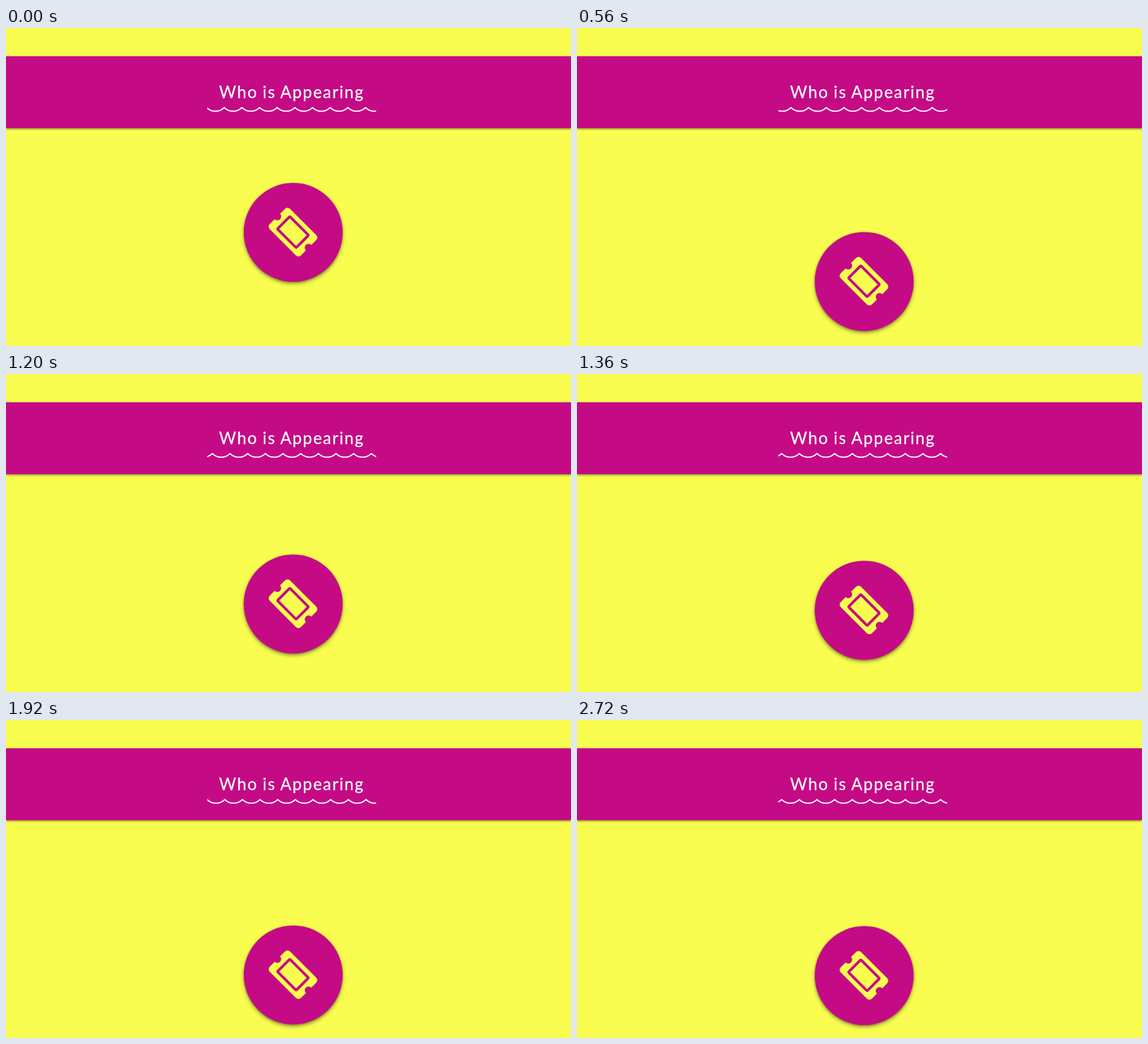
Recreate the animation shown at these times as an HTML page. Size 960 px wide and 540 px high, loop 2.8 s.

```html
<!DOCTYPE html>
<html lang="en">
<head>
<meta charset="utf-8">
<title>Who is Appearing</title>
<style>
  html, body { margin: 0; width: 100%; height: 100%; overflow: hidden; background: #f9fd50; }
  body { position: relative; }
  .bar, .ball, .wave { position: absolute; }
  .bar {
    left: 0; top: 48px; width: 960px; height: 122px; background: #c50a86;
    box-shadow: 0 2px 3px rgba(0, 0, 0, .42);
  }
  .title {
    position: absolute; left: 362px; top: 40px; margin: 0; white-space: pre;
    font: 400 28px/40px Lato, sans-serif; letter-spacing: 1.9px; word-spacing: -1px;
    color: #fff; -webkit-text-stroke: .3px #fff;
  }
  .wave { left: 342px; top: 130px; }
  .ball {
    left: 404px; top: 350px; width: 168px; height: 168px; border-radius: 50%; background: #c50a86;
    box-shadow: 0 3px 6px rgba(0, 0, 0, .42), 0 1px 3px rgba(0, 0, 0, .2);
  }
</style>
</head>
<body>
<div class="bar"><h1 class="title">Who is Appearing</h1></div>
<svg class="wave" width="287" height="16">
  <path id="wave" fill="none" stroke="#fff" stroke-width="2" stroke-linejoin="round"/>
</svg>
<div class="ball" id="ball">
  <svg width="168" height="168" viewBox="-84 -84 168 168">
    <g transform="translate(-.4 -.4) rotate(45)" fill="#f9fd50">
      <rect x="-37.5" y="-24.4" width="75" height="48.8" rx="6"/>
      <g fill="#c50a86"><circle cx="-37.5" r="6.5"/><circle cx="37.5" r="6.5"/></g>
      <rect x="-22.5" y="-14.9" width="45" height="29.8" rx="1.5" stroke="#c50a86" stroke-width="4.5"/>
    </g>
  </svg>
</div>
<script>
const LOOP = 2800, STEP = 80, WAVELENGTH = 30;
const wave = document.getElementById('wave');
const ball = document.getElementById('ball');

wave.setAttribute('d', 'M-30 5' + 'a21 21 0 0 0 30 0'.repeat(12));

// Height above the resting place: [time, pixels]
const bounce = [[0, 87], [750, 0], [1050, 43.5], [1200, 43.5], [2100, 0], [LOOP, 0]];

const bezier = (a, b, s) => 3 * s * (1 - s) ** 2 * a + 3 * s * s * (1 - s) * b + s ** 3;

// The CSS "ease" curve
function ease(p) {
  let low = 0, high = 1;
  for (let i = 0; i < 24; i++) {
    const mid = (low + high) / 2;
    if (bezier(.25, .25, mid) < p) low = mid; else high = mid;
  }
  return bezier(.1, 1, low);
}

function heightAt(t) {
  const i = bounce.findIndex(([time]) => time > t);
  const [t0, h0] = bounce[i - 1], [t1, h1] = bounce[i];
  return h0 + (h1 - h0) * ease((t - t0) / (t1 - t0));
}

function draw(now) {
  const t = Math.floor(now % LOOP / STEP) * STEP;
  const shift = WAVELENGTH / 2 * (1 - Math.cos(Math.PI * (t - 2040) / 2250)) - .5;
  wave.setAttribute('transform', `translate(${shift} 0)`);
  ball.style.transform = `translateY(${-heightAt(t)}px)`;
  requestAnimationFrame(draw);
}
draw(0);
</script>
</body>
</html>
```
